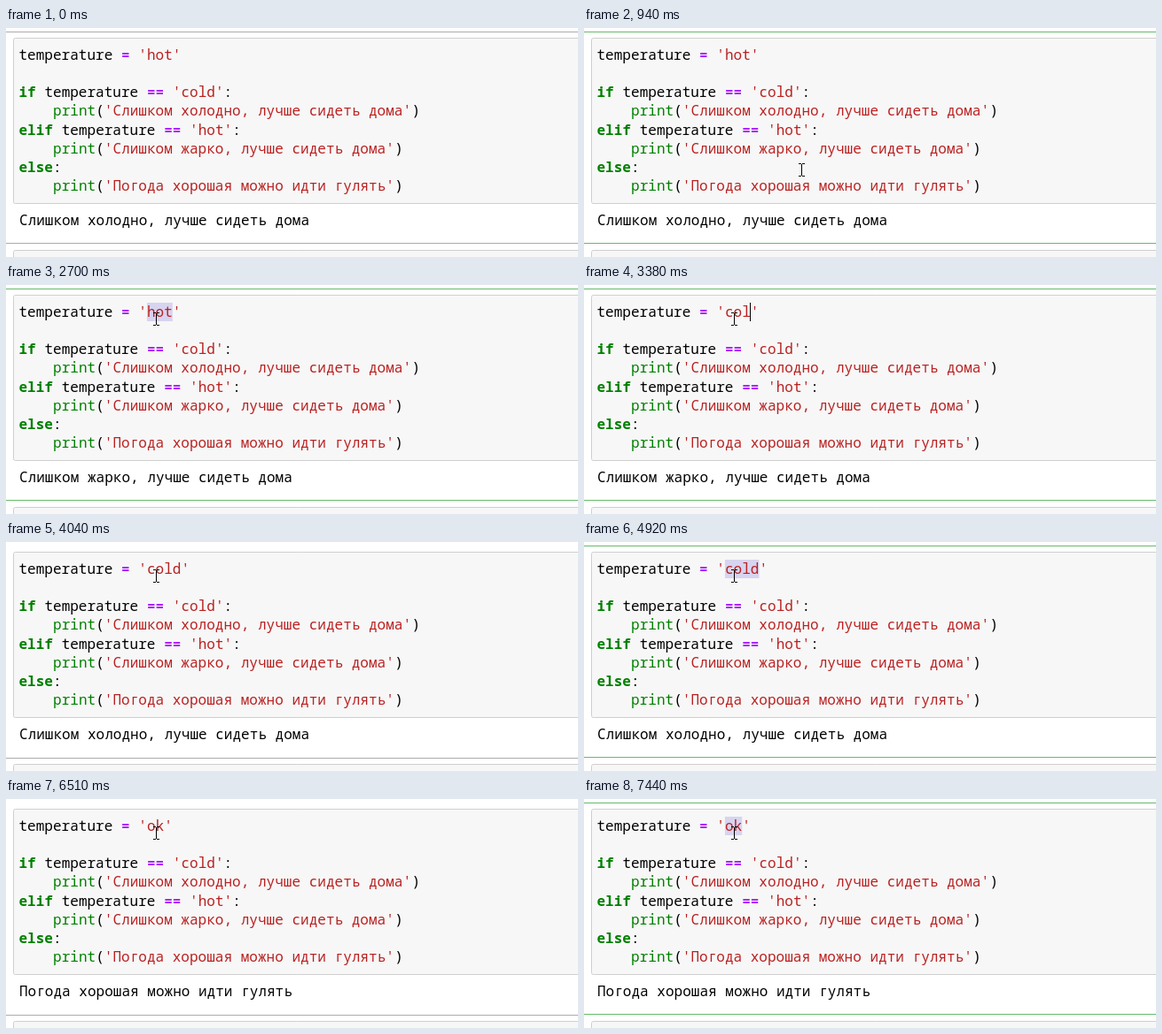
An HTML page with a canvas for the animation above (8 s loop, 645 by 259 pixels).

```html
<!DOCTYPE html>
<html lang="ru">
<head>
<meta charset="utf-8">
<style>
  html, body { margin: 0; width: 645px; height: 259px; overflow: hidden; background: #fff; }
  canvas { display: block; }
</style>
</head>
<body>
<canvas id="stage" width="645" height="259"></canvas>
<script>
const ctx = document.getElementById('stage').getContext('2d');
const LOOP = 8000, BLINK = 530;
const CHAR = 9.63, LINE = 21.2, LEFT = 14.5, TOP = 20;
const FONT = '16.05px "Noto Sans Mono", monospace';
const COLD = 'Слишком холодно, лучше сидеть дома';
const HOT = 'Слишком жарко, лучше сидеть дома';
const FINE = 'Погода хорошая можно идти гулять';

// Each step changes part of the state; caret is [row, column].
const steps = [
  [0, { word: 'hot', out: COLD, mode: 'command' }],
  [410, { mode: 'edit', caret: [6, 5] }],
  [1200, { mode: 'idle', caret: null, out: '' }],
  [1260, { out: HOT }],
  [2340, { mode: 'edit', caret: [0, 16] }],
  [2490, { selected: true, caret: null }],
  [3110, { word: 'c', selected: false, caret: [0, 16] }],
  [3250, { word: 'co', caret: [0, 17] }],
  [3380, { word: 'col', caret: [0, 18] }],
  [3510, { word: 'cold', caret: [0, 19] }],
  [4040, { mode: 'idle', caret: null, out: COLD }],
  [4650, { mode: 'edit', caret: [0, 16] }],
  [4790, { selected: true, caret: null }],
  [5980, { word: 'o', selected: false, caret: [0, 16] }],
  [6110, { word: 'ok', caret: [0, 17] }],
  [6510, { mode: 'idle', caret: null, out: FINE }],
  [7170, { mode: 'edit', caret: [0, 16] }],
  [7310, { selected: true, caret: null }]
];

// Pointer path: time, x, y
const path = [
  [200, 645, 175], [410, 250, 162], [540, 245, 160], [1790, 245, 160],
  [2000, 185, 69], [2070, 185, 69], [2490, 173, 41], [2630, 171, 40], [2700, 169, 38]
];

function stateAt(t) {
  const state = {};
  for (const [time, change] of steps) {
    if (time > t) break;
    Object.assign(state, change, { since: time });
  }
  return state;
}

function pointerAt(t) {
  if (t < path[0][0]) return null;
  const i = path.findIndex(p => p[0] > t);
  if (i < 0) return path[path.length - 1].slice(1);
  const [t0, x0, y0] = path[i - 1], [t1, x1, y1] = path[i];
  const k = (t - t0) / (t1 - t0);
  return [Math.round(x0 + (x1 - x0) * k), Math.round(y0 + (y1 - y0) * k)];
}

function rect(color, x, y, w, h) {
  ctx.fillStyle = color;
  ctx.fillRect(x, y, w, h);
}

function text(str, x, y, color, bold) {
  ctx.font = (bold ? 'bold ' : '') + FONT;
  ctx.fillStyle = color;
  ctx.fillText(str, x, y);
}

function inputBox(y, h) {
  ctx.beginPath();
  ctx.roundRect(8.5, y + 0.5, 660, h - 1, 2);
  ctx.fillStyle = '#f7f7f7';
  ctx.fill();
  ctx.strokeStyle = '#cfcfcf';
  ctx.stroke();
}

function codeLine(line, row) {
  const y = Math.floor(TOP + 16.2 + row * LINE);
  for (const m of line.matchAll(/'[^']*'|\w+|[^\s\w']+/g)) {
    const token = m[0];
    const keyword = /^(if|elif|else)$/.test(token), operator = /^=+$/.test(token);
    const color = token[0] === "'" ? '#ba2121'
      : operator ? '#aa22ff'
      : keyword || token === 'print' ? '#008000' : '#000';
    text(token, LEFT + m.index * CHAR, y, color, keyword || operator);
  }
}

function pointer([x, y]) {
  rect('#000', x, y - 6, 1, 13);
  for (const dy of [-7, 7]) {
    rect('#000', x - 3, y + dy, 3, 1);
    rect('#000', x + 1, y + dy, 3, 1);
  }
}

function draw(t) {
  const { word, out, mode, selected, caret, since } = stateAt(t);
  const bottom = out ? 244 : 205;
  rect('#fff', 0, 0, 645, 259);

  if (mode === 'idle') {
    rect('#ababab', 0, bottom, 645, 1);
  } else {
    const border = mode === 'edit' ? '#66bb6a' : '#ababab';
    rect(border, 0, 4, 645, 1);
    rect(border, 0, bottom - 1, 645, 1);
  }
  inputBox(11, 188);
  inputBox(bottom + 7, 80);

  if (selected) rect('#d7d4f0', LEFT + 15 * CHAR, TOP, word.length * CHAR, 21);
  [
    `temperature = '${word}'`,
    '',
    "if temperature == 'cold':",
    `    print('${COLD}')`,
    "elif temperature == 'hot':",
    `    print('${HOT}')`,
    'else:',
    `    print('${FINE}')`
  ].forEach(codeLine);
  text(out, LEFT + 0.5, 223, '#000');

  if (caret && (t - since) % (2 * BLINK) < BLINK) {
    const [row, col] = caret;
    rect('#000', Math.floor(LEFT + col * CHAR), Math.floor(TOP + row * LINE), 1, 21);
  }
  const position = pointerAt(t);
  if (position) pointer(position);
}

const start = performance.now();
function tick() {
  draw((performance.now() - start) % LOOP);
  requestAnimationFrame(tick);
}
tick();
</script>
</body>
</html>
```
